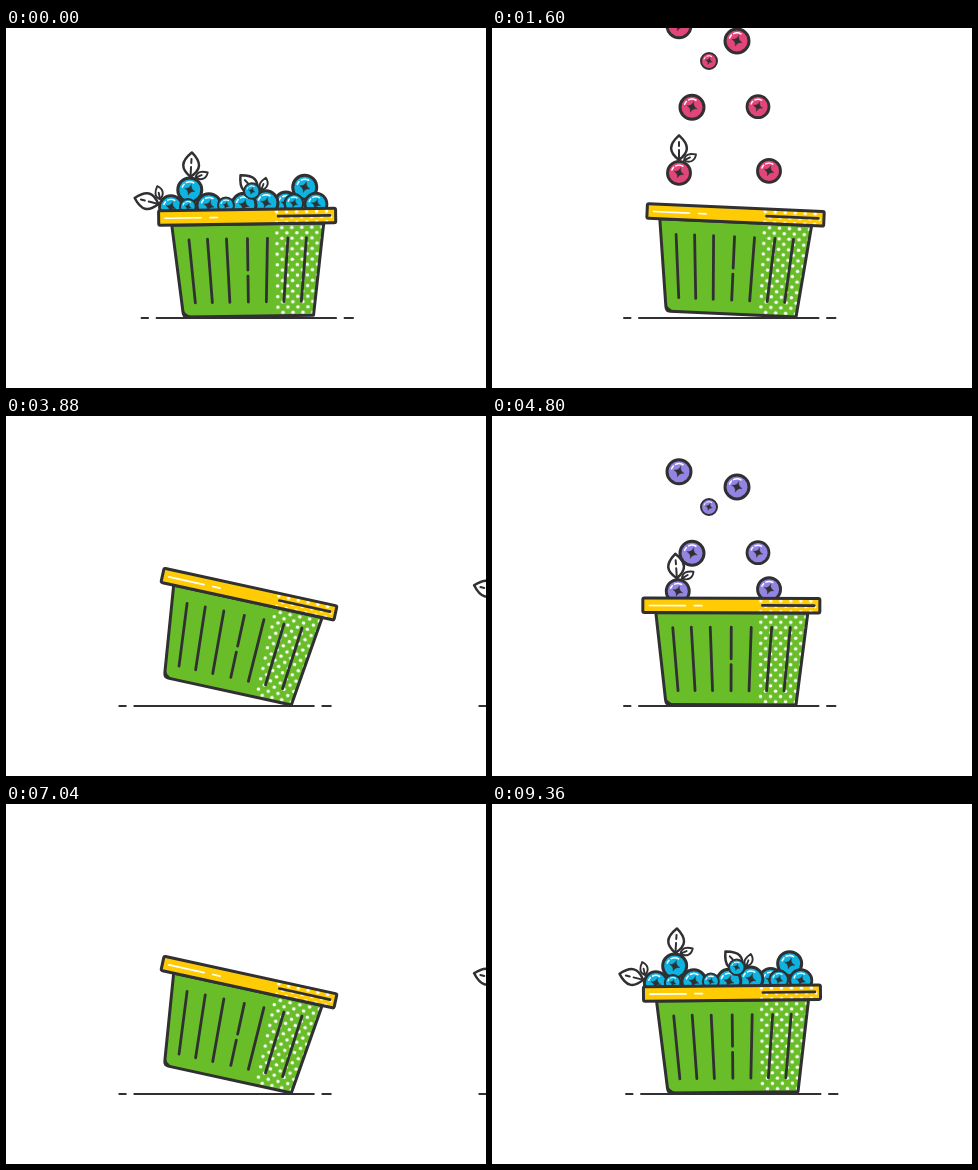
Animation of 480x360 px, one loop 9400 ms. Source, as an HTML page:

```html
<!DOCTYPE html>
<html lang="en">
<head>
<meta charset="utf-8">
<title>Berry baskets</title>
<style>
html, body { margin: 0; width: 100%; height: 100%; overflow: hidden; background: #fff; }
svg { display: block; width: 100vw; height: 100vh; }
.ink { stroke: #303033; stroke-linecap: round; stroke-linejoin: round; }
</style>
</head>
<body>
<svg id="stage" viewBox="0 0 480 360">
  <defs>
    <pattern id="dots" width="10" height="10.6" x="266" y="182.500" patternUnits="userSpaceOnUse">
      <circle cx="2.5" cy="2.6" r="1.75" fill="#fff"/>
      <circle cx="7.5" cy="7.9" r="1.75" fill="#fff"/>
    </pattern>
    <g id="berry">
      <circle class="ink" r="12" fill="currentColor" stroke-width="3"/>
      <path d="M-7.4-3A8 8 0 0 1-5.6-5.8M-3.4-7.3A8 8 0 0 1 4-7" fill="none" stroke="#fff" stroke-width="1.5" stroke-linecap="round"/>
      <path d="M0-5.4Q.8-.8 5.4 0Q.8 .8 0 5.4Q-.8 .8-5.4 0Q-.8-.8 0-5.4Z" class="ink" fill="#303033" stroke-width=".4" transform="rotate(18)"/>
    </g>
    <g id="leaves" class="ink" fill="#fff" stroke-width="2.500">
      <path d="M0-13C-10.500-21-10.500-28 0-37.500C10.500-28 10.500-21 0-13Z"/>
      <path d="M0-13V-23M0-27V-31" fill="none" stroke-width="2"/>
      <path d="M5-12.500C6-19 11-19.500 17-18.500C16-12 11-9.500 5-12.500ZM5-12.500L11-15.500" stroke-width="1.900"/>
    </g>
    <path id="ground" class="ink" d="M132 290H138.5M147 290H326.5M335 290H343.5" fill="none" stroke-width="2"/>
    <g id="basket" class="ink" fill="none">
      <path d="M163.5 197H315.5L304 289H178Q174 289 173.500 284Z" fill="#69bd28" stroke="none"/>
      <path d="M266 197H315.500L304 289H266Z" fill="url(#dots)" stroke="none"/>
      <path d="M172.500 278Q174 287 184 289H174Z" fill="#303033" stroke="none"/>
      <path d="M163.500 197H315.500L304 289H178Q174 289 173.500 284Z" stroke-width="3"/>
      <path d="M180.500 212L186 275M199 211.500L203 275M218 211.500L220.500 275M239 211.500V243M239 249V275M259 211.500L257 275M279.500 211.500L274.500 275M298 211.500L292 275" stroke-width="2.800"/>
      <rect x="150.500" y="182.500" width="177" height="14.500" rx="1.500" fill="#ffcb05" stroke="none"/>
      <rect x="266" y="183" width="58" height="14" fill="url(#dots)" stroke="none"/>
      <path d="M157 190H193M202 190H209.500" stroke="#fff" stroke-width="1.700"/>
      <path d="M270 189.500H322" stroke-width="2.700"/>
      <rect x="150.500" y="182.500" width="177" height="14.500" rx="1.500" stroke-width="3"/>
    </g>
  </defs>
</svg>
<script>
const NS = 'http://www.w3.org/2000/svg';
const CYCLE = 3120, LOOP = 9400, GAP = 360, SPEED = 0.725;
const COLORS = ['#e2457a', '#9484e2', '#0fb3e0'];

const slide = [[-200, 0], [-40, 2], [0, 3.5], [220, 39], [440, 140], [720, 324], [760, 341], [800, 351], [920, 360]];
const rock = [[440, 0], [760, 12.3], [880, 14.5], [1200, -8], [1480, 4], [1600, 2.6], [1700, 0]];
const lean = [[-200, 0], [-40, -0.6], [0, -0.8], [260, -5], [700, 0]];

// Drawn back to front; turn is [from, to, start time].
const berries = [
  { x0: 245, land: 1859, x: 240, y: 200, r: 12 },
  { x0: 187, land: 1880, x: 190, y: 200, r: 12 },
  { x0: 300, land: 2050, x: 290, y: 200, r: 12 },
  { x0: 215, land: 2230, x: 210, y: 200, r: 12 },
  { x0: 182, land: 2420, x: 182, y: 162, r: 12, hop: 8, turn: [4, 4, 2420] },
  { x0: 296, land: 2655, x: 297, y: 161, r: 12, hop: 5 },
  { x0: 277, land: 1648, x: 278, y: 177, r: 11.5, hop: 8 },
  { x0: 266, land: 1738, x: 308, y: 178, r: 11, hop: 14 },
  { x0: 187, land: 1648, x: 163, y: 179, r: 11.5, hop: 8, turn: [0, -75, 1648] },
  { x0: 180, land: 2000, x: 180, y: 179, r: 8, hop: 6 },
  { x0: 200, land: 1740, x: 200, y: 180, r: 12, hop: 8 },
  { x0: 257, land: 2150, x: 258, y: 176, r: 12, hop: 8, turn: [12, -42, 2657] },
  { x0: 236, land: 2440, x: 236, y: 178, r: 12, hop: 9 },
  { x0: 287, land: 2440, x: 286, y: 177, r: 9.3, hop: 9 },
  { x0: 244, land: 2657, x: 244, y: 164, r: 7.8, hop: 4 },
  { x0: 206, land: 2752, x: 201, y: 178, r: 12, hop: 4 },
  { x0: 217, land: 1801, x: 218, y: 178, r: 8, hop: 6 }
];

const clamp = (v, a = 0, b = 1) => Math.min(b, Math.max(a, v));
const ease = p => p * p * (3 - 2 * p);

// Smooth monotone curve through [time, value] points.
function curve(pts, t) {
  const n = pts.length - 1;
  if (t <= pts[0][0]) return pts[0][1];
  if (t >= pts[n][0]) return pts[n][1];
  const i = pts.findIndex(p => p[0] > t) - 1;
  const slope = k => (pts[k + 1][1] - pts[k][1]) / (pts[k + 1][0] - pts[k][0]);
  const tangent = k => {
    if (k === 0 || k === n) return 0;
    const a = slope(k - 1), b = slope(k);
    return a * b <= 0 ? 0 : 2 * a * b / (a + b);
  };
  const [t0, v0] = pts[i], [t1, v1] = pts[i + 1];
  const d = t1 - t0, p = (t - t0) / d, q = 1 - p;
  return v0 * (1 + 2 * p) * q * q + v1 * p * p * (3 - 2 * p)
    + d * p * q * (tangent(i) * q - tangent(i + 1) * p);
}

function add(parent, tag, href) {
  const el = parent.appendChild(document.createElementNS(NS, tag));
  if (href) el.setAttribute('href', href);
  return el;
}

const setTransform = (el, value) => el.setAttribute('transform', value);

function makeScene() {
  const root = add(document.getElementById('stage'), 'g');
  add(root, 'use', '#ground');
  const load = add(root, 'g');
  const fruit = berries.map(b => {
    const g = add(load, 'g');
    const leaves = b.turn && add(g, 'use', '#leaves');
    setTransform(add(g, 'use', '#berry'), `scale(${b.r / 12})`);
    return { g, leaves };
  });
  return { root, load, fruit, basket: add(load, 'use', '#basket') };
}

// t runs from the start of the scene's entry, past CYCLE while it leaves.
function pose(scene, x, t, color) {
  setTransform(scene.root, `translate(${x} 0)`);
  scene.root.style.color = color;
  setTransform(scene.load, `rotate(${curve(lean, t - CYCLE)} 174 289)`);
  const tilt = curve(rock, t);
  setTransform(scene.basket, `rotate(${tilt} ${tilt > 0 ? 304 : 174} 289)`);
  berries.forEach((b, i) => {
    const { g, leaves } = scene.fruit[i];
    const p = clamp((t - b.land) / 240);
    const fall = Math.max(0, b.land - t) * SPEED;
    const bx = b.x0 + (b.x - b.x0) * ease(p);
    const by = b.y - fall - 4 * (b.hop || 0) * p * (1 - p);
    setTransform(g, `translate(${bx} ${by})`);
    g.style.display = by < -60 ? 'none' : '';
    if (leaves) {
      const [from, to, start] = b.turn;
      setTransform(leaves, `rotate(${from + (to - from) * ease(clamp((t - start) / 240))})`);
    }
  });
}

const leaving = makeScene(), current = makeScene();

function draw(ms) {
  const t = ms % LOOP;
  const n = Math.min(2, Math.floor(t / CYCLE));
  // The last cycle starts after a 40 ms hold.
  const u = n < 2 ? t - n * CYCLE : Math.max(0, t - 2 * CYCLE - 40);
  const s = curve(slide, u);
  pose(leaving, s, u + CYCLE, COLORS[(n + 2) % 3]);
  pose(current, s - GAP + curve(slide, u - CYCLE), u, COLORS[n]);
}

const begin = performance.now();
function tick() {
  draw(performance.now() - begin);
  requestAnimationFrame(tick);
}
tick();
</script>
</body>
</html>
```
